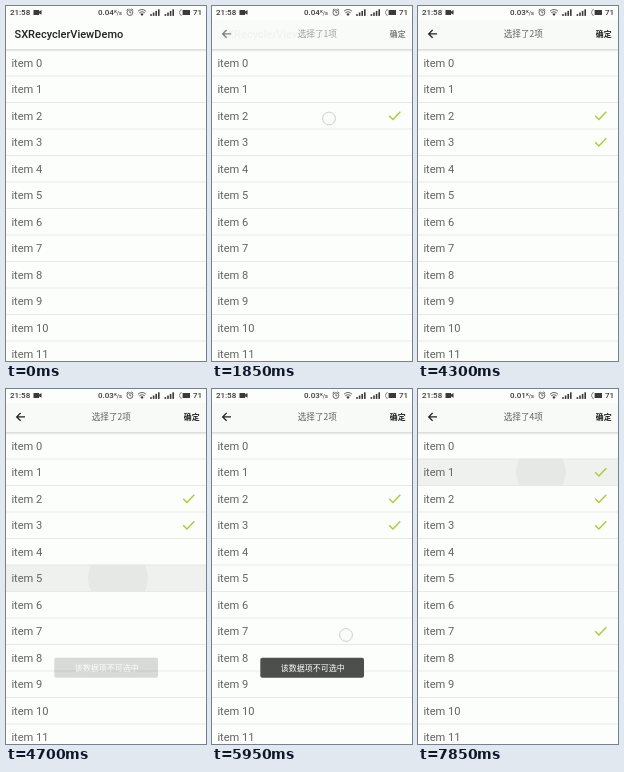
These frames come from a looping animation (200 px wide and 355 px high, 8 s). An HTML page:

```html
<!DOCTYPE html>
<html lang="zh">
<head>
<meta charset="utf-8">
<title>List selection</title>
<style>
html, body { margin: 0; width: 100%; height: 100%; overflow: hidden; background: #fcfefb; }
svg { display: block; width: 100%; height: 100%; }
text { font-family: Roboto, "Noto Sans CJK SC", "Noto Sans CJK", sans-serif; }
.cjk { font-family: "Noto Sans CJK SC", "Noto Sans CJK", Roboto, sans-serif; }
.item { font-size: 11.1px; fill: #626462; }
.status { font-size: 8px; font-weight: 500; }
.line { fill: none; stroke: #444; stroke-width: .8; }
</style>
</head>
<body>
<svg viewBox="0 0 200 355" preserveAspectRatio="none">
  <defs>
    <linearGradient id="shade" x2="0" y2="1">
      <stop offset="0" stop-color="#000" stop-opacity=".15"/>
      <stop offset="1" stop-color="#000" stop-opacity="0"/>
    </linearGradient>
    <clipPath id="rowClip"><rect id="clipBox" width="200" height="26.5"/></clipPath>
  </defs>
  <rect width="200" height="355" fill="#fcfefb"/>

  <g clip-path="url(#rowClip)">
    <rect id="tint" width="200" height="26.5"/>
    <circle id="ripple"/>
  </g>
  <g id="rows"></g>

  <rect y="43" width="200" height="3" fill="url(#shade)"/>
  <text id="title" x="8.5" y="31.7" font-size="11" font-weight="500" fill="#222">SXRecyclerViewDemo</text>
  <g id="bar">
    <rect y="14" width="200" height="29" fill="#f8faf7"/>
    <path d="M19 27.9H10.8M14.6 24L10.7 27.9L14.6 31.8" fill="none" stroke="#222" stroke-width="1.3"/>
    <text id="count" class="cjk" x="105.3" y="31.2" font-size="8.6" text-anchor="middle" fill="#606260"></text>
    <text class="cjk" x="177.8" y="30.9" font-size="7.9" font-weight="700" fill="#222">确定</text>
  </g>

  <g fill="#3a3a3a">
    <text x="3.9" y="9.4" class="status">21:58</text>
    <path d="M27.5 3.9h5.6v1.6l2.4-1.4v4.6l-2.4-1.4v1.6h-5.6z"/>
    <text id="speed" x="92" y="9.4" class="status"></text>
    <text x="108.2" y="6.8" font-size="4" font-weight="700">K</text>
    <text x="110.8" y="9.4" font-size="5.6" font-weight="500">/s</text>
    <text x="187" y="9.4" class="status">71</text>
    <path d="M176.6 4h7.4v5h-7.4z"/>
    <path class="line" d="M176 3.7H174.6V5H173.6V8H174.6V9.3H176" stroke-opacity=".6"/>
    <g id="signals"></g>
    <path d="M136 10.1l-1.7-2.2q1.7-1.3 3.4 0z"/>
  </g>
  <g class="line">
    <circle cx="123.9" cy="6.6" r="2.9"/>
    <path d="M123.9 4.8V6.8H125.3M120.6 4.2L122.3 2.8M127.2 4.2L125.5 2.8"/>
    <path d="M132 5.2Q136 1.7 140 5.2M133.2 6.8Q136 4.3 138.8 6.8"/>
  </g>

  <g id="toast">
    <rect x="48.3" y="268.8" width="103.7" height="20" rx="2" fill="#4d4f4d"/>
    <text class="cjk" x="100.8" y="282" font-size="8" text-anchor="middle" fill="#fff">该数据项不可选中</text>
  </g>
  <circle id="touch" r="6.4" fill="#fafbfa" fill-opacity=".8" stroke="#c8cac8" stroke-width=".9"/>
</svg>
<script>
const LOOP = 8000, STEP = 50, ROW = 26.5, TOP = 43.5;
const $ = id => document.getElementById(id);
const ramp = (t, a, b) => Math.min(1, Math.max(0, (t - a) / (b - a)));
const set = (el, attrs) => { for (const k in attrs) el.setAttribute(k, attrs[k]); };
const add = (parent, tag, attrs) => {
  const el = document.createElementNS("http://www.w3.org/2000/svg", tag);
  set(el, attrs);
  return parent.appendChild(el);
};

// pick: time the row becomes checked; speed: ripple growth in px per ms
const taps = [
  { row: 2, x: 117, y: 112.5, down: 1000, up: 1950, press: 1200, end: 1750, pick: 1700, tint: .02, speed: 0 },
  { row: 3, x: 112, y: 136, down: 2600, up: 2700, press: 2650, end: 3200, pick: 2700, tint: .045, speed: .115 },
  { row: 5, x: 112, y: 189, down: 4450, up: 4550, press: 4500, end: 4950, tint: .052, speed: .12 },
  { row: 7, x: 134, y: 246, down: 5950, up: 6100, press: 6050, end: 6450, pick: 6100, tint: .052, speed: .11 },
  { row: 1, x: 123, y: 83, down: 7600, up: 7750, press: 7650, end: 8000, pick: 7700, tint: .052, speed: .1 }
];
const picks = taps.filter(p => p.pick);

for (let i = 0; i < 12; i++) {
  const y = TOP + i * ROW;
  add($("rows"), "text", { x: 5.4, y: y + 17.4, class: "item" }).textContent = "item " + i;
  add($("rows"), "rect", { y: y + ROW - .4, width: 200, height: .8, fill: "#e2e4e1" });
}
for (const p of picks) {
  const y = TOP + p.row * ROW + 13.2;
  p.mark = add($("rows"), "path", {
    d: `M177.2 ${y}l3.7 3.7l7.4-7.6`, fill: "none", stroke: "#aaca35", "stroke-width": 1.4
  });
}
for (const x of [144.2, 158.6])
  for (let i = 0; i < 4; i++) {
    const h = 1.8 + i * 1.6;
    add($("signals"), "rect", { x: x + i * 2.6, y: 9.9 - h, width: 1.6, height: h });
  }

function draw(t) {
  const tap = taps.find(p => t >= p.press && t < p.end);
  set($("tint"), { opacity: tap ? tap.tint : 0 });
  set($("ripple"), { opacity: 0 });
  if (tap) {
    const y = TOP + tap.row * ROW - .5;
    const age = t - tap.down;
    set($("clipBox"), { y });
    set($("tint"), { y });
    set($("ripple"), {
      cx: tap.x, cy: tap.y, r: age * tap.speed,
      opacity: .04 * (1 - ramp(age, 250, 380))
    });
  }

  const finger = taps.find(p => t >= p.down && t < p.up);
  set($("touch"), { opacity: finger ? 1 : 0 });
  if (finger) set($("touch"), { cx: finger.x, cy: finger.y });

  for (const p of picks) set(p.mark, { opacity: t >= p.pick ? 1 : 0 });
  const n = picks.filter(p => t >= p.pick).length;
  $("count").textContent = `选择了${n || 1}项`;
  set($("title"), { opacity: 1 - ramp(t, 1680, 1865) });
  set($("bar"), { opacity: ramp(t, 1680, 1980) });

  $("speed").textContent = t < 4300 ? "0.04" : t < 7300 ? "0.03" : "0.01";
  set($("toast"), { opacity: ramp(t, 4640, 4940) * (1 - ramp(t, 6570, 6780)) });
}

const start = performance.now();
function tick() {
  const t = (performance.now() - start) % LOOP;
  draw(Math.floor(t / STEP) * STEP);
  requestAnimationFrame(tick);
}
tick();
</script>
</body>
</html>
```
